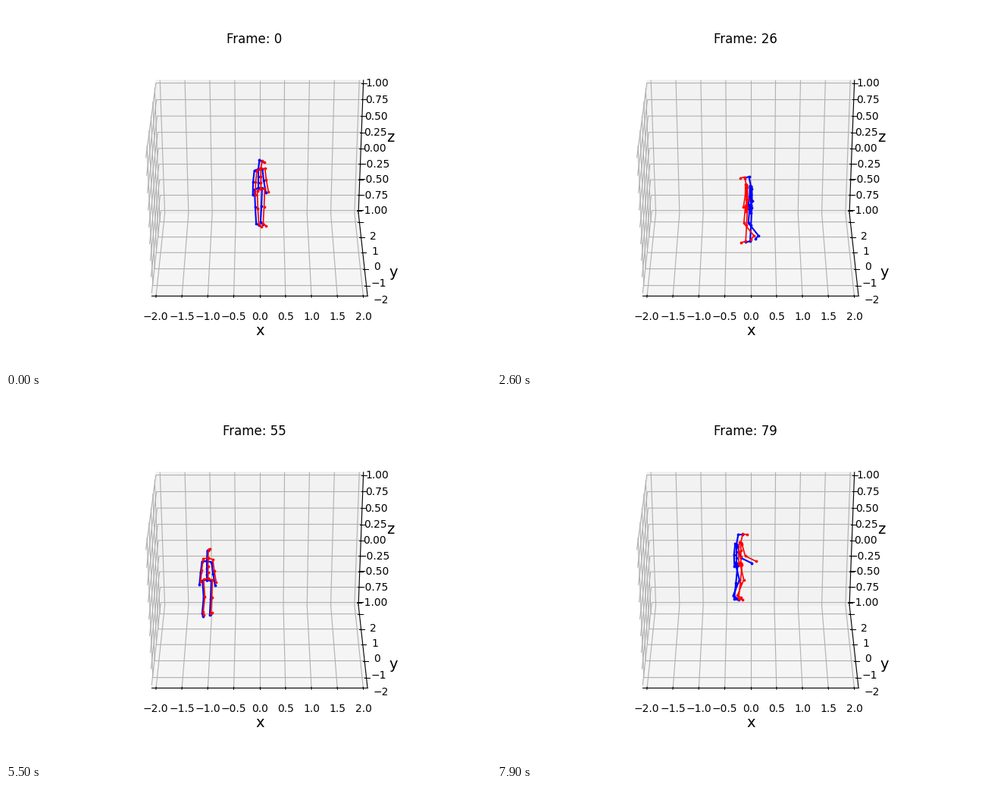
These frames come from a looping animation (640 by 480 pixels, 8000 ms). A matplotlib script:

```python
import matplotlib.pyplot as plt
import numpy as np
from matplotlib.animation import FuncAnimation

FRAMES, INTERVAL = 80, 100
MARGIN = 25 / 24
STEP = 5.8      # frames per step
DEPTH = 0.3     # foreshortening of the depth direction
THIGH, SHIN, UPPER_ARM, FOREARM = 23.5, 21.5, 15, 16
GAP = (np.nan, np.nan)

# Walked loop: time, pelvis x, pelvis y, heading in degrees
ROUTE = np.array([[0, 333, 240, 55], [16, 338, 253, 80], [26, 335, 263, 168],
                  [37, 293, 262, 215], [55, 265, 240, 285],
                  [69, 284, 225, 330], [79, 316, 218, 345]])


def smooth(u):
    u = np.clip(u, 0, 1)
    return u * u * (3 - 2 * u)


def along_route(t):
    """Cubic Hermite interpolation of position and heading."""
    times, keys = ROUTE[:, 0], ROUTE[:, 1:]
    i = min(np.searchsorted(times, t, side="right") - 1, len(times) - 2)
    span = times[i + 1] - times[i]
    u = (t - times[i]) / span
    slope = np.gradient(keys, times, axis=0) * span
    return (keys[i] + smooth(u) * (keys[i + 1] - keys[i])
            + u * (1 - u) ** 2 * slope[i] + u * u * (u - 1) * slope[i + 1])


def swing(length, degrees):
    """Forward and upward extent of a hanging limb segment."""
    a = np.radians(degrees)
    return length * np.array([np.sin(a), -np.cos(a)])


def skeleton(t, lead, torso, head_len):
    x, y, heading = along_route(t)
    c, s = np.cos(np.radians(heading)), np.sin(np.radians(heading))

    def at(forward, side, up):
        ahead = forward + lead
        return (x + ahead * c - side * s,
                y + DEPTH * (ahead * s + side * c) - up)

    pace = smooth(t / 22)
    path = [at(0, 0, k * torso) for k in (0, 0.3, 0.6, 1)]
    path += [at(2.5, 0, torso + head_len), at(8, 0, torso + head_len - 1), GAP]
    for side in (1, -1):
        phase = np.pi * ((t - 26) / STEP + (side < 0)) + 0.1

        thigh = pace * (4 + 18 * np.sin(phase))
        shin = thigh - pace * 44 * max(0, np.cos(phase))
        hip = np.array([0, -1])
        knee = hip + swing(THIGH, thigh)
        ankle = knee + swing(SHIN, shin)
        toe = ankle + swing(6, shin + 78)
        path += [at(0, 0, 0), at(hip[0], 6 * side, hip[1]),
                 at(knee[0], 5 * side, knee[1]),
                 at(ankle[0], 3.5 * side, ankle[1]),
                 at(toe[0], 3.5 * side, toe[1]), GAP]

        arm = -8 * pace * np.sin(phase)
        raised = 50 * smooth((t - 71) / 8) * (side > 0)
        shoulder = np.array([0, torso - 1])
        elbow = shoulder + swing(UPPER_ARM, arm + raised / 5)
        hand = elbow + swing(FOREARM, arm + 8 + raised)
        path += [at(0, 0, torso), at(shoulder[0], 6.5 * side, shoulder[1]),
                 at(elbow[0], 8.5 * side, elbow[1]),
                 at(hand[0], 10.5 * side, hand[1]), GAP]
    return np.array(path)


def to_world(points):
    """Map stage pixels to data on the plane y = 0."""
    t = (237.4 - points[:, 1]) / 1997.8
    z = 10 * t / (np.sqrt(0.75) + 0.5 * t)
    x = (points[:, 0] - 334.7) / 2681 * (10 - 0.5 * z)
    return 4 * x, 0 * x, 2 * z


fig = plt.figure(figsize=(6.4, 4.8), dpi=100, facecolor="white")
ax = fig.add_subplot(projection="3d", facecolor="none")
ax.apply_aspect = lambda position=None: None  # fill the wide axes box
ax.set_box_aspect((1, 1, 1), zoom=np.sqrt(3) / 1.8294640721620434)
ax.view_init(elev=30, azim=-90 + 1e-7)
ax.set_xlim(-2 * MARGIN, 2 * MARGIN)
ax.set_ylim(-2.5 * MARGIN, 2.5 * MARGIN)
ax.set_zlim(-MARGIN, MARGIN)
ax.set_xticks(np.linspace(-2, 2, 9))
ax.set_yticks(np.arange(-2, 3))
ax.set_zticks(np.linspace(-1, 1, 9))
ax.set_xlabel("x", fontsize=14)
ax.set_ylabel("y", fontsize=14)
ax.set_zlabel("z", fontsize=14)
title = ax.set_title("Frame: 0")

people = []
for color, width, *build in (("blue", 1.5, 0, 25, 13),
                             ("red", 1.2, 6, 27, 11)):
    line, = ax.plot([], [], [], color=color, lw=width, marker="o", ms=2.2,
                    mew=0.5)
    people.append((line, build))


def update(n):
    title.set_text(f"Frame: {n}")
    for line, build in people:
        line.set_data_3d(*to_world(skeleton(n, *build)))
    return [title] + [line for line, _ in people]


anim = FuncAnimation(fig, update, frames=FRAMES, interval=INTERVAL,
                     repeat=True, repeat_delay=0)
plt.show()
```
